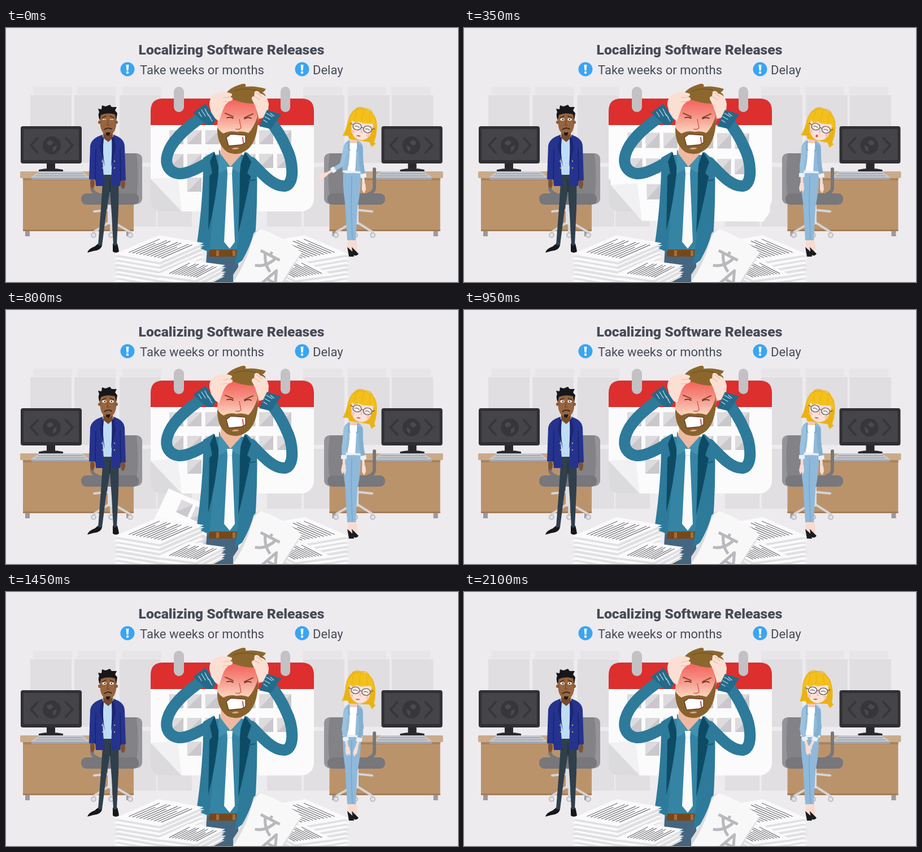
Animation of 800 by 450 pixels, one loop 2.15 s. Source, as an HTML page:

```html
<!DOCTYPE html>
<html lang="en">
<head>
<meta charset="utf-8">
<title>Localizing Software Releases</title>
<style>
html, body { margin: 0; width: 100%; height: 100%; overflow: hidden; background: #edebee; }
svg { display: block; width: 100%; height: 100%; }
text { font-family: Roboto, "Noto Sans", sans-serif; fill: #464b57; }
.title { font-weight: 900; font-size: 24.7px; }
.sub { font-size: 22px; }
.line { fill: none; stroke-linecap: round; stroke-linejoin: round; }
.move { animation: 2150ms linear infinite; }

.head { transform-origin: 616px 203px; animation-name: head; }
@keyframes head {
  0% { transform: rotate(9deg); }
  16%, 26% { transform: rotate(11deg); }
  37%, 54% { transform: rotate(9deg); }
  74%, 100% { transform: rotate(0deg); }
}
.upper { transform-origin: 604px 207px; animation-name: upper; }
@keyframes upper {
  0%, 2% { transform: rotate(6deg); }
  13%, 100% { transform: rotate(0deg); }
}
.fore { transform-origin: 598px 243px; animation-name: fore; }
@keyframes fore {
  0%, 2% { transform: rotate(53deg); }
  13%, 58% { transform: rotate(0deg); }
  73%, 100% { transform: rotate(-17deg); }
}
.fore2 { transform-origin: 629px 240px; animation-name: fore2; }
@keyframes fore2 {
  0%, 58% { transform: rotate(0deg); }
  73%, 100% { transform: rotate(31deg); }
}
.mouth { transform-origin: 622px 190px; animation-name: mouth; }
@keyframes mouth {
  0%, 8% { transform: scale(1, 1); }
  15%, 27% { transform: scale(.6, 2.2); }
  35%, 100% { transform: scale(1, 1); }
}
.eyes { transform-origin: 180px 162px; animation-name: eyes; }
@keyframes eyes {
  0%, 3% { transform: scaleY(.35); }
  8%, 21% { transform: scaleY(1); }
  25%, 28% { transform: scaleY(.35); }
  33%, 100% { transform: scaleY(1); }
}
</style>
</head>
<body>
<svg viewBox="0 0 800 450">
<defs>
  <linearGradient id="flush" x1="0" y1="0" x2="0" y2="1">
    <stop offset=".12" stop-color="#f4615a"/>
    <stop offset=".36" stop-color="#f58c80"/>
    <stop offset=".64" stop-color="#fbcdb8"/>
  </linearGradient>
  <g id="desk">
    <path d="M34 358h8v11h-8zM213 358h8v11h-8z" fill="#9a9a9e"/>
    <path d="M30 264H226V360H30z" fill="#bb936b"/>
    <path d="M30 264H226V270H30z" fill="#a8825d"/>
    <path d="M30 357H226V360H30z" fill="#a37c57"/>
    <rect x="25" y="254" width="205" height="12" rx="2" fill="#c9ab8b"/>
    <path d="M72 238H87V250H72zM58 251Q79 246 101 251V254H58z" fill="#29292d"/>
    <rect x="26" y="174" width="108" height="66" rx="4" fill="#303034"/>
    <path d="M31 179H129V234H31z" fill="#454449"/>
    <g class="line" stroke="#37363b" stroke-width="4">
      <path d="M56 195L44 208L56 221M106 195L118 208L106 221"/>
      <circle cx="81" cy="208" r="14" fill="#37363b"/>
      <path d="M72 202l7-4 5 5-5 5-5-1zM83 211l7-4-2 9-5 3z" fill="#4b4a4f" stroke="none"/>
    </g>
    <path d="M59 254H135L147 264V267H45V264z" fill="#c6c9cf"/>
    <path class="line" d="M57 258H136M53 262H140" stroke="#9da1a9" stroke-width="1.3" stroke-dasharray="4 1"/>
    <path d="M45 265H147V269H45z" fill="#a3a6ad"/>
  </g>
  <g id="chair">
    <path class="line" d="M186 342L156 361M186 342L219 361M186 342V364M186 322L156 325" stroke="#d4d4d8" stroke-width="4"/>
    <path d="M180 312H191V348H180z" fill="#dedee1"/>
    <g fill="#e4e4e7" stroke="#bdbdc2" stroke-width="2">
      <circle cx="155" cy="367" r="4"/><circle cx="186" cy="367" r="4"/><circle cx="220" cy="367" r="4"/>
    </g>
    <path d="M203 222H229Q241 222 241 234V300Q241 312 229 312H196Q205 270 203 222z" fill="#828287"/>
    <path d="M231 222Q241 223 241 234V300Q241 311 229 312Q237 270 231 222z" fill="#949499"/>
    <path class="line" d="M152 250V282Q152 291 162 294" stroke="#77777c" stroke-width="6"/>
    <rect x="133" y="293" width="102" height="20" rx="9" fill="#77777c"/>
  </g>
  <g id="alert">
    <circle r="12.5" fill="#3aa5f2"/>
    <path d="M-2.4 -8H2.4L1.5 2.5H-1.5z" fill="#fff"/><circle cy="6" r="2.2" fill="#fff"/>
  </g>
</defs>

<rect width="800" height="450" fill="#edebee"/>
<g id="wall"></g>

<text class="title" x="399" y="46.5" text-anchor="middle">Localizing Software Releases</text>
<use href="#alert" x="215" y="73"/>
<text class="sub" x="237" y="82">Take weeks or months</text>
<use href="#alert" x="524" y="73"/>
<text class="sub" x="543" y="82">Delay</text>

<!-- calendar -->
<rect x="256" y="125" width="289" height="200" rx="22" fill="#fbfbfc"/>
<path d="M256 267L311 325H278Q256 325 256 303z" fill="#dbdadd"/>
<g id="calendar"></g>
<g id="page"></g>
<path d="M256 172V147Q256 125 278 125H523Q545 125 545 147V172z" fill="#dc2f2e"/>
<rect x="297" y="104" width="18" height="45" rx="9" fill="#c3c1c4"/>
<rect x="486" y="104" width="17" height="45" rx="8.5" fill="#c3c1c4"/>

<use href="#desk"/>
<use href="#desk" transform="translate(798.5) scale(-1 1)"/>
<use href="#chair"/>
<use href="#chair" transform="translate(804) scale(-1 1)"/>

<!-- man on the left -->
<g>
  <path d="M163 382L170 385Q168 394 155 395L144 398Q146 391 157 387zM189 382H197Q199 389 200 396Q194 400 189 396z" fill="#17171b"/>
  <path d="M172 258H200L199 320L196 385H190L187 330L184 288L177 330L170 385H163L168 320z" fill="#303f4c"/>
  <path d="M184 268V290" class="line" stroke="#22303b" stroke-width="1.5"/>
  <ellipse cx="153" cy="275" rx="4" ry="9" fill="#80512f"/>
  <ellipse cx="207" cy="276" rx="4" ry="9" fill="#80512f"/>
  <path d="M172 181H189V200L181 208L172 198z" fill="#784a2d"/>
  <path d="M170 193L181 202L191 193L193 260H171z" fill="#bfdcf6"/>
  <path d="M171 189Q151 195 149 209L147 268H158L159 280H175Q169 235 171 189zM190 189Q209 195 210 209L212 270H203L202 280H186Q187 240 190 189z" fill="#25338f"/>
  <path d="M170 191L166 211L175 246Q170 220 173 196zM191 191L194 213L186 246Q188 220 187 196z" fill="#1b2670"/>
  <path class="line" d="M159 214L158 269M202 214L203 271" stroke="#182163" stroke-width="1.3"/>
  <g fill="#c5a85e"><circle cx="170" cy="236" r="1.2"/><circle cx="171" cy="248" r="1.2"/><circle cx="192" cy="236" r="1.2"/><circle cx="192" cy="248" r="1.2"/></g>
  <path d="M166 151Q180 142 195 151V173Q192 189 181 190Q170 189 167 174z" fill="#97653f"/>
  <circle cx="166" cy="167" r="3" fill="#8c5938"/><circle cx="195" cy="167" r="3" fill="#8c5938"/>
  <path d="M166 164Q162 154 165 149L163 143L169 144L170 137L176 139L184 136L187 140L196 140L193 146L197 151L195 164L193 153Q180 149 168 154z" fill="#17171b"/>
  <g class="move eyes">
    <ellipse cx="174" cy="162" rx="3.6" ry="2.2" fill="#fff"/><ellipse cx="187" cy="162" rx="3.6" ry="2.2" fill="#fff"/>
    <circle cx="175" cy="162" r="1.2" fill="#1c1512"/><circle cx="187" cy="162" r="1.2" fill="#1c1512"/>
  </g>
  <path class="line" d="M170 159L177 156M184 156L191 159" stroke="#2b1a12" stroke-width="1.3"/>
  <path class="line" d="M181 163L179 172H183" stroke="#6b4026" stroke-width="1.1"/>
  <path class="line" d="M174 180Q180 175 187 179" stroke="#231811" stroke-width="1.5"/>
  <path d="M177 185H185L183 190Q180 192 177 189z" fill="#231811"/>
</g>

<!-- stressed man -->
<g>
  <path d="M356 388H410L412 450H352z" fill="#456680"/>
  <path d="M359 393H411V405H359z" fill="#774719"/>
  <path d="M372 394h5v10h-5zM401 394h5v10h-5z" fill="#a96d31"/>
  <path d="M366 225H429L414 392H359z" fill="#3584a4"/>
  <path d="M368 219L349 230Q350 300 337 388L360 397Q370 310 368 219zM425 219L444 237Q446 310 440 385L428 405L405 421Q421 310 425 219z" fill="#2d7a9a"/>
  <g class="line" stroke="#2d7a9a" stroke-width="20">
    <path d="M362 236C342 247 322 259 305 258C274 253 269 208 351 155"/>
    <path d="M434 238C450 254 472 282 494 280C512 276 508 235 496 212C488 192 476 175 464 160"/>
  </g>
  <path d="M369 219L361 237L365 257L360 262Q359 320 358 359Q371 310 377 249zM423 219L434 237L427 257L433 263Q423 315 411 364Q414 300 414 245z" fill="#0d4b65"/>
  <path class="line" d="M429 271L441 269" stroke="#175e7b" stroke-width="2"/>
  <path d="M377 215L396 248L417 218L414 257L396 247L376 258z" fill="#4391b0"/>
  <path d="M391 246H401L400 258L405 379L396 391L386 379L392 258z" fill="#fafafa"/>
  <path class="line" d="M392 258H400" stroke="#d3d9de" stroke-width="1.2"/>
  <path d="M381 207H419L416 225L397 246L379 222z" fill="#efb9a1"/>

  <path d="M386 119Q419 105 449 127Q450 165 438 195Q425 221 403 220Q378 211 374 178Q374 144 386 119z" fill="url(#flush)"/>
  <path d="M374 176Q379 184 385 187Q396 181 408 184Q420 182 429 186Q438 178 446 155Q447 195 430 213Q412 229 392 220Q373 207 374 176z" fill="#87622c"/>
  <path d="M390 194L398 188L424 190L424 203L416 207L394 209z" fill="#fff" stroke="#6d3a2b" stroke-width="1.3"/>
  <path class="line" d="M419 194l1 9" stroke="#cf4f42" stroke-width="2"/>
  <path d="M399 214Q406 210 413 213Q406 217 399 214z" fill="#dfa47f"/>
  <path class="line" d="M388 151L402 157M422 159L437 152" stroke="#8a4a2c" stroke-width="2"/>
  <path class="line" d="M391 159Q397 157 402 160M422 161Q428 157 434 160" stroke="#4b2420" stroke-width="1.5"/>
  <path class="line" d="M413 162L416 177Q412 181 407 179" stroke="#d25b4a" stroke-width="1.4"/>
  <path d="M386 122Q392 106 418 99Q426 98 424 104Q442 102 460 108Q458 112 454 114Q463 119 457 126L449 130L446 160L441 134Q417 134 395 124z" fill="#8c672d"/>
  <path class="line" d="M403 112Q423 104 447 112" stroke="#775422" stroke-width="1.3"/>

  <path d="M365 157L360 137Q359 122 373 116Q387 111 399 116Q402 119 397 122L401 124Q402 129 395 130Q388 134 384 145L377 165z" fill="#fbdfd2"/>
  <path class="line" d="M397 122L385 124M395 130L384 131" stroke="#e7b9a7" stroke-width="1.2"/>
  <path d="M448 161L441 138L435 126Q434 121 439 121L440 113Q445 109 450 116Q463 119 465 135L463 157z" fill="#fbdfd2"/>
  <path class="line" d="M440 121L449 127M444 115L453 122" stroke="#e7b9a7" stroke-width="1.2"/>
  <path d="M331 150L353 134L372 163L365 172L355 172z" fill="#246a8a"/>
  <path d="M448 174L462 145L487 153L469 179z" fill="#246a8a"/>
  <g class="line" stroke="#bcd8e3" stroke-width="1.3">
    <path d="M341 149l5 8M346 145l7 11M352 143l6 12M356 151l6 8M361 159l4 6"/>
    <path d="M456 163l6 4M458 157l9 5M461 151l10 6M468 151l6 5"/>
  </g>
</g>

<g id="stacks"></g>

<!-- loose sheet -->
<path d="M451 356Q444 357 438 364Q431 395 402 437V450H492Q509 421 523 399z" fill="#dcdbde"/>
<path d="M451 356Q440 361 435 378Q425 417 402 450H489Q506 421 523 398Q501 375 451 356z" fill="#f8f8f9"/>
<g class="line" stroke="#b9b8bc" stroke-width="5" style="stroke-linecap:butt" transform="translate(464 410) rotate(27)">
  <path d="M-19 -8H19M0 -15V-8M11 -8Q4 13 -16 20M-10 -8Q-2 11 13 18"/>
  <path d="M9 43L22 11L35 43M14 32H30"/>
</g>

<!-- woman -->
<g>
  <path d="M605 374H612L615 391L619 399L622 403H609Q604 393 605 374zM613 372H620L622 391L619 397L613 386z" fill="#f8dbcf"/>
  <path d="M604 388L614 397L616 405H607zM612 388L624 400Q621 405 614 402z" fill="#1b1b20"/>
  <path d="M597 251H628Q629 285 622 318L619 376H604L600 310Q595 278 597 251z" fill="#8fb9da"/>
  <path class="line" d="M612 263L611 318L613 374" stroke="#76a5cf" stroke-width="1.4"/>
  <path d="M611 191H624L623 212L615 217L609 206z" fill="#f3cabb"/>
  <path d="M606 204L624 204L624 257H600z" fill="#fff"/>
  <path d="M608 198Q598 203 597 213L595 251L604 253Q610 230 608 198zM622 199Q632 204 632 213V254L618 256Q619 227 622 199z" fill="#92bad8"/>
  <path class="line" d="M608 201L606 213L609 217M622 202L624 215L620 218" stroke="#6799c5" stroke-width="1.2"/>
  <path class="line" d="M597 254L629 256" stroke="#e9f0f7" stroke-width="3.5"/>
  <g class="move fore2">
    <path class="line" d="M632 263L633 281" stroke="#f9ddd2" stroke-width="4.5"/>
    <path d="M630 276H636L637 286L634 293L630 287z" fill="#f9ddd2"/>
    <path class="line" d="M629 240L632 259" stroke="#83afd0" stroke-width="7.5"/>
    <path d="M627 259L637 257L638 264L628 266z" fill="#eaf2fa"/>
  </g>
  <path class="line" d="M627 210L629 240" stroke="#83afd0" stroke-width="7.5"/>
  <g class="move upper">
    <g class="move fore">
      <path class="line" d="M598 259L598 278" stroke="#f9ddd2" stroke-width="4.5"/>
      <path d="M595 274H601L602 284L600 292L598 287L595 291L593 284z" fill="#f9ddd2"/>
      <path class="line" d="M598 243L598 256" stroke="#9ac1de" stroke-width="7.5"/>
      <path d="M593 257H603V264H593z" fill="#eaf2fa"/>
    </g>
    <path class="line" d="M602 210L598 243" stroke="#9ac1de" stroke-width="7.5"/>
  </g>
  <g class="move head">
    <path d="M624 141C606 139 600 153 599 171Q598 186 594 194L604 193L607 198H643L648 206L654 199L651 196Q655 177 649 158Q642 142 624 141z" fill="#eab313"/>
    <path class="line" d="M610 143Q617 137 626 141Q634 138 640 146" stroke="#eab313" stroke-width="1.5"/>
    <path d="M606 160Q624 152 645 162Q646 196 625 197Q605 195 606 160z" fill="#fbe2d9"/>
    <path d="M601 172Q600 144 624 142Q648 144 650 173L643 165L634 166L626 167L619 165L612 168L607 165z" fill="#f4c01c"/>
    <path class="line" d="M612 148L610 162M624 145L623 163M635 147L638 164" stroke="#e6b014" stroke-width="1"/>
    <g class="line" stroke="#45444b" stroke-width="1.2">
      <ellipse cx="617" cy="174" rx="7.5" ry="6" fill="#fdeee8"/>
      <ellipse cx="636" cy="176" rx="7.5" ry="6" fill="#fdeee8"/>
      <path d="M624.5 174L628.5 175M609 172L605 170M644 175L648 173"/>
      <path d="M613 174Q617 172 621 175M632 176Q636 174 640 177" stroke-width="1"/>
    </g>
    <path class="line" d="M626 178L625 183H628" stroke="#e3a695" stroke-width="1"/>
    <circle cx="611" cy="184" r="3" fill="#f7c6bd"/><circle cx="639" cy="186" r="3" fill="#f7c6bd"/>
    <ellipse class="move mouth" cx="622" cy="190" rx="3.5" ry="1.1" fill="#d34d4f"/>
  </g>
</g>
</svg>

<script>
const LOOP = 2150, STEP = 50;
const get = id => document.getElementById(id);
const mix = (a, b, k) => a + (b - a) * k;
const poly = (points, fill) =>
  `<polygon points="${points.map(p => p.map(n => n.toFixed(1))).join(' ')}" fill="${fill}"/>`;

// Wall of pale panels
const panel = (x, y, w, h, fill) => `<rect x="${x}" y="${y}" width="${w}" height="${h}" fill="${fill}"/>`;
let wall = '';
for (const x of [48, 126, 206, 526, 604, 682]) wall += panel(x, 104, 69, 110, '#e7e5e8');
for (const x of [43, 121, 201, 526, 606, 683]) {
  wall += panel(x, 118, 74, 122, '#edebee') + panel(x, 119, 73, 120, '#e0dee1');
}
for (const x of [205, 268, 462, 527]) wall += panel(x, 246, 61, 106, '#e1dfe2');
get('wall').innerHTML = wall;

// A calendar sheet stretched between four corners: TL, TR, BR, BL, then the arch of its top
function sheet([ax, ay, bx, by, cx, cy, dx, dy, arch], filled) {
  const at = (u, v) => [
    mix(mix(ax, bx, u), mix(dx, cx, u), v),
    mix(mix(ay, by, u), mix(dy, cy, u), v) - arch * Math.sin(Math.PI * u) * (1 - v)
  ];
  let out = '';
  if (filled) {
    const top = Array.from({ length: 13 }, (_, i) => at(i / 12, 0));
    out += poly([...top, at(1, .9), at(.96, 1), at(.19, 1), at(0, .62)], '#fcfcfd');
  }
  for (let row = 0; row < 3; row++) for (let col = 0; col < 7; col++) {
    if (row === 2 && (col === 0 || col > 4)) continue;
    const u = (33 + col * 31.8) / 289, v = (9 + row * 42) / 153;
    const u2 = u + 25 / 289, v2 = v + 25 / 153;
    out += poly([at(u, v), at(u2, v), at(u2, v2), at(u, v2)], '#dddbde');
    out += poly([at(u2, v), at(u2, v2), at(u, v2)], '#cac8cc');
  }
  return out + poly([at(0, .62), at(.165, .6), at(.178, .8), at(.19, 1)], '#f1f0f2');
}

const rest = [256, 172, 545, 172, 545, 325, 256, 325, 0];
get('calendar').innerHTML = sheet(rest, false);

const fall = [
  [200, rest],
  [350, [256, 175, 545, 177, 541, 343, 262, 341, 0]],
  [550, [262, 255, 548, 250, 530, 400, 288, 400, 24]],
  [800, [288, 316, 520, 420, 460, 560, 225, 450, 0]],
  [1000, [292, 425, 520, 540, 460, 680, 225, 560, 0]]
];

function pageAt(t) {
  const i = fall.findIndex(([time]) => time > t);
  if (i < 1) return '';
  const [t0, from] = fall[i - 1], [t1, to] = fall[i];
  return sheet(from.map((n, j) => mix(n, to[j], (t - t0) / (t1 - t0))), true);
}

// Piles of printed paper
function pile(matrix, layers) {
  let out = '';
  for (let i = layers; i >= 0; i--) {
    const shift = i ? Math.sin(i * 2.4) * 2 : 0;
    out += `<g transform="translate(${shift.toFixed(1)} ${i * 4})"><rect width="100" height="100"
      transform="matrix(${matrix})" fill="${i % 2 ? '#e0dfe2' : '#fafafb'}"/></g>`;
  }
  let rows = '';
  for (let y = 16; y < 90; y += 8) rows += `M16 ${y}H${y % 3 ? 86 : 68}`;
  return out + `<path d="${rows}" transform="matrix(${matrix})" stroke="#75757b"
    stroke-width="1.2" vector-effect="non-scaling-stroke"/>`;
}
const left = pile('.78 -.34 .8 .14 192 401', 12);
const front = pile('.52 -.27 .66 .09 270 438', 5);
const flip = (art, x) => `<g transform="translate(${x}) scale(-1 1)">${art}</g>`;
get('stacks').innerHTML = left + front + flip(left, 799) + flip(front, 848);

function draw() {
  const t = Math.floor(performance.now() % LOOP / STEP) * STEP;
  get('page').innerHTML = pageAt(t);
  requestAnimationFrame(draw);
}
draw();
</script>
</body>
</html>
```
